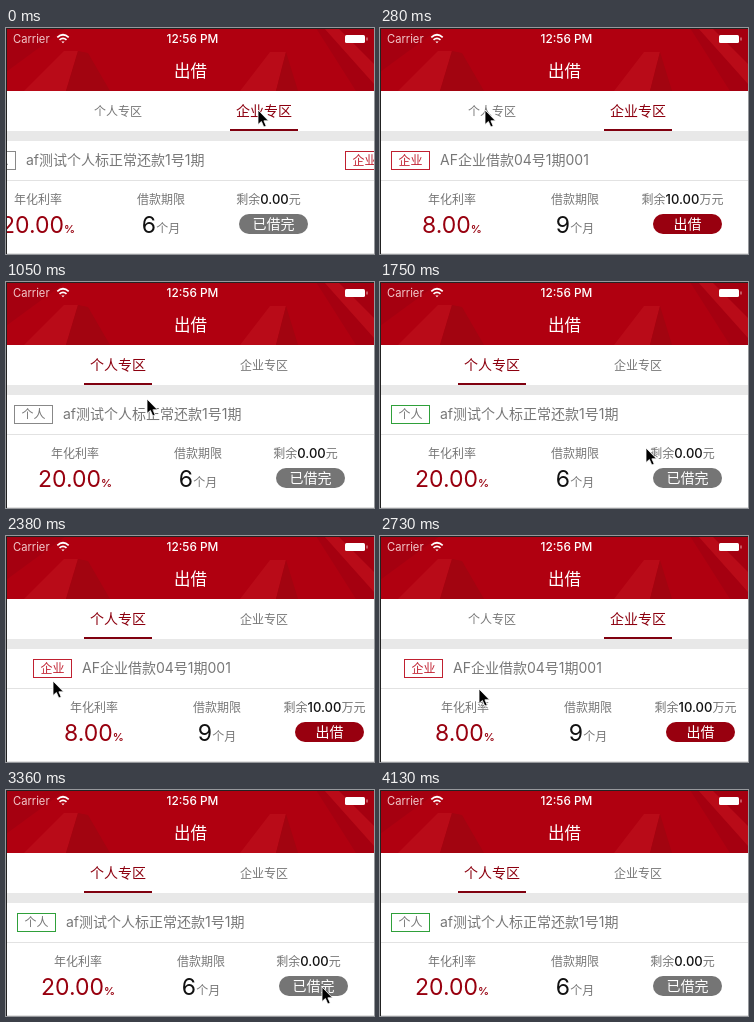
An HTML page that plays this animation: 368x226 px, repeating every 4.34 s.

```html
<!DOCTYPE html>
<html lang="zh-CN">
<head>
<meta charset="utf-8">
<style>
html, body { margin: 0; width: 100%; height: 100%; overflow: hidden; background: #fff; }
svg { display: block; width: 368px; height: 226px; font-family: Inter, "Noto Sans CJK SC", "Noto Sans CJK", sans-serif; }
text { font-size: 12px; fill: #777; text-anchor: middle; }
.title { font-size: 14px; text-anchor: start; }
.big { font-size: 23px; }
.red { fill: #98000f; }
.black { fill: #111; }
.amount { font-size: 13px; font-weight: 500; fill: #111; }
.percent { font-size: 11px; font-weight: 600; }
.button { font-size: 14px; fill: #fff; }
.tab.on { font-size: 14px; fill: #8c000f; }
</style>
</head>
<body>
<svg viewBox="0 0 368 226">
  <rect width="368" height="226" fill="#fff"/>
  <rect y="103" width="368" height="10" fill="#e8e8e8"/>
  <g id="pages"></g>
  <path d="M0 152.5H368M0 225.5H368" stroke="#e2e2e2"/>

  <rect width="368" height="63" fill="#b00010"/>
  <path d="M0 0H60L0 44ZM310 0H368V63H350Z" fill="#a50010"/>
  <path d="M18 63 58 23 72 23 60 63ZM234 63 264 24 280 24 270 63ZM318 0 332 0 368 36V56Z" fill="#b90b18"/>
  <path d="M72 23 82 25 104 63H60ZM280 24 292 63H270Z" fill="#a20410"/>
  <text x="7" y="15" style="text-anchor:start;font-size:11.2px;fill:#f2c8cb">Carrier</text>
  <g fill="none" stroke="#fff" stroke-width="1.7">
    <path d="M51.3 9.3Q57 4.2 62.7 9.3M53.5 11.8Q57 8.8 60.5 11.8"/>
    <path d="M55.4 13.4H58.6L57 15.2Z" fill="#fff" stroke="none"/>
  </g>
  <text x="186.5" y="15" style="font-size:11.8px;font-weight:500;fill:#fff">12:56 PM</text>
  <rect x="339" y="7" width="20" height="8" rx="1.5" fill="#fff"/>
  <path d="M361 9.5V12.5" stroke="#e8b0b4"/>
  <text x="184.5" y="48.5" style="font-size:16.5px;fill:#fff">出借</text>

  <text class="tab" x="112" y="88">个人专区</text>
  <text class="tab" x="258" y="88">企业专区</text>
  <rect id="underline" y="101" width="68" height="2" fill="#80000f"/>
  <path d="M.5 226V.5H368" fill="none" stroke="#222"/>
  <path id="cursor" d="M0 0V14.5L3.4 11.5 5.8 17 8.2 16 5.9 10.8H10.5Z" fill="#000" stroke="#fff" stroke-width=".8"/>
</svg>
<script>
const $ = id => document.getElementById(id);
const LOOP = 4340, STEP = 70, WIDTH = 368;

const card = (x, c) => `<g transform="translate(${x})">
  <rect class="tag" x="11.5" y="123.5" width="38" height="18" fill="none" stroke="${c.border}"/>
  <text x="30.5" y="137" style="fill:${c.tagColor}">${c.tag}</text>
  <text class="title" x="60" y="137">${c.title}</text>
  <text x="72" y="176">年化利率</text>
  <text class="big red" x="72" y="205">${c.rate}<tspan class="percent">%</tspan></text>
  <text x="195" y="176">借款期限</text>
  <text x="195" y="205"><tspan class="big black">${c.months}</tspan>个月</text>
  <text x="302.5" y="176">剩余<tspan class="amount">${c.left}</tspan>${c.unit}</text>
  <rect x="273" y="186" width="69" height="20" rx="10" fill="${c.fill}"/>
  <text class="button" x="307.5" y="201">${c.button}</text>
</g>`;

$('pages').innerHTML =
  card(0, { tag: '个人', tagColor: '#777', border: '#2fa03a', title: 'af测试个人标正常还款1号1期', rate: '20.00',
    months: 6, left: '0.00', unit: '元', fill: '#757575', button: '已借完' }) +
  card(WIDTH, { tag: '企业', tagColor: '#c02030', border: '#c02030', title: 'AF企业借款04号1期001', rate: '8.00',
    months: 9, left: '10.00', unit: '万元', fill: '#98000f', button: '出借' });

// Rows of [time, value, ...]; values ease in and out between rows.
const scrollKeys = [[-75, 0], [275, WIDTH], [720, WIDTH], [1070, 0], [1980, 0], [2441, WIDTH], [2660, WIDTH], [3253, 0]];
const cursorKeys = [[0, 252, 82], [280, 105, 82], [770, 105, 82], [1050, 141, 117], [1260, 150, 122], [1330, 150, 122],
  [1750, 266, 166], [1890, 293, 168], [1960, 293, 168], [2310, 47, 145], [2520, 47, 145], [2660, 77, 152],
  [3010, 311, 158], [3640, 319, 224]];

function sample(keys, t) {
  const next = keys.findIndex(k => k[0] > t);
  if (next < 0) return keys[keys.length - 1].slice(1);
  const a = keys[next - 1], b = keys[next];
  const u = (1 - Math.cos(Math.PI * (t - a[0]) / (b[0] - a[0]))) / 2;
  return a.slice(1).map((v, i) => v + (b[i + 1] - v) * u);
}

const tabs = document.querySelectorAll('.tab');
const personalTag = document.querySelector('.tag');

function draw(t) {
  const scroll = Math.round(sample(scrollKeys, t)[0]);
  const [x, y] = sample(cursorKeys, t).map(Math.round);
  const company = t < 770 || (t >= 2450 && t < 3290);
  $('pages').setAttribute('transform', `translate(${-scroll})`);
  personalTag.setAttribute('stroke', scroll ? '#888' : '#2fa03a');
  tabs[0].classList.toggle('on', !company);
  tabs[1].classList.toggle('on', company);
  $('underline').setAttribute('x', company ? 224 : 78);
  $('cursor').setAttribute('transform', `translate(${x} ${y})`);
  $('cursor').setAttribute('visibility', t < 3710 ? 'visible' : 'hidden');
}

const start = performance.now();
function frame() {
  const t = (performance.now() - start) % LOOP;
  draw(Math.floor(t / STEP) * STEP);
  requestAnimationFrame(frame);
}
frame();
</script>
</body>
</html>
```
